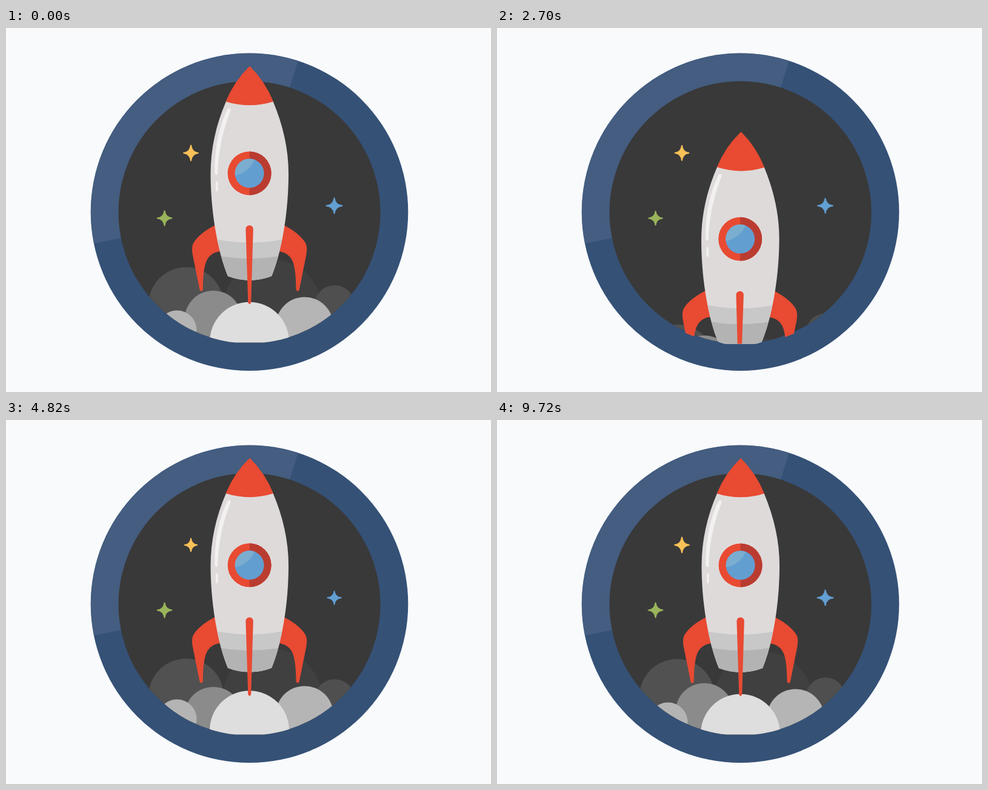
Recreate the animation shown at these times as an HTML page. Size 800 by 600 pixels, loop 9.76 s.

```html
<!DOCTYPE html>
<html lang="en">
<head>
<meta charset="utf-8">
<title>Rocket badge</title>
<style>
html, body { margin: 0; width: 100%; height: 100%; overflow: hidden; background: #f8fafc; }
svg { display: block; width: 800px; height: 600px; }
</style>
</head>
<body>
<svg viewBox="0 0 800 600">
  <defs>
    <path id="sky" d="M185.5 303.7A216 216 0 0 1 617.5 303.7A216 216 0 0 1 424 518.6H379A216 216 0 0 1 185.5 303.7Z"/>
    <path id="hull" d="M363 121C346 160 337.5 200 337.5 240C337.5 300 348 365 366 409Q402 422.5 438 409C456 365 466 300 466 240C466 200 457 160 440.5 121Z"/>
    <path id="fin" d="M345 325C331 332 317 342 310 353C306.5 358.5 306.6 365 307.7 373L319.5 431.5Q322 436 324.7 431.5C325 412 326 398 329.5 387C333.5 375.5 342 369 354 368.2Z"/>
    <clipPath id="skyClip"><use href="#sky"/></clipPath>
    <clipPath id="hullClip"><use href="#hull"/></clipPath>
    <clipPath id="glassClip"><circle cx="401.6" cy="239.5" r="24"/></clipPath>
    <clipPath id="launchClip"><path d="M0 0H800V304H620A218.5 218.5 0 0 1 429.500 520.6H373.500A218.5 218.5 0 0 1 183 304H0Z"/></clipPath>
  </defs>

  <circle cx="401.5" cy="303.3" r="261.8" fill="#355176"/>
  <path d="M401.5 303.3L145.2 355.3A261.8 261.8 0 0 1 482 54.3Z" fill="#445d80"/>
  <use href="#sky" fill="#393939"/>
  <g id="stars"></g>
  <g id="clouds" clip-path="url(#skyClip)"></g>

  <g clip-path="url(#launchClip)">
    <g id="rocket">
      <g fill="#e84a32">
        <use href="#fin"/>
        <use href="#fin" transform="translate(803.2 0) scale(-1 1)"/>
      </g>
      <use href="#hull" fill="#dedada"/>
      <g clip-path="url(#hullClip)">
        <path d="M330 344.5Q401.7 363 473 344.5V430H330Z" fill="#c8c8c8"/>
        <path d="M330 371Q401.7 389 473 371V430H330Z" fill="#b3b3b3"/>
      </g>
      <path d="M362.5 121.2Q376.5 87.500 400.8 64Q402 62.3 403.2 64Q427 87.500 441 121.2Q402 133.5 362.5 121.2Z" fill="#e84a32"/>
      <path d="M365 134.5C350 165 343.5 205 344.7 240A2.3 2.3 0 0 0 349.3 240C349.5 208 357 170 370 137.5C372 132 367 131 365 134.5Z" fill="#f2f0f0"/>
      <path d="M347.8 254.5V267.5" stroke="#f2f0f0" stroke-width="3.4" stroke-linecap="round"/>
      <circle cx="401.6" cy="239.5" r="36" fill="#e84a32"/>
      <path d="M401.6 203.5A36 36 0 0 1 401.6 275.5Z" fill="#ba3c31"/>
      <g clip-path="url(#glassClip)">
        <rect x="376" y="214" width="52" height="52" fill="#639ed1"/>
        <path d="M374 243.5Q401 240 412 214H374Z" fill="#7aadcf"/>
      </g>
      <path d="M395.4 331.5A6.2 6.2 0 0 1 407.8 331.5L404.2 452.5Q401.7 457.5 399.3 452.5Z" fill="#e84a32"/>
    </g>
  </g>
</svg>
<script>
const LOOP = 9760, CUT = 1800, RISE = 1977, CLOUD_RISE = 2200, RISE_TIME = 1200;
const NS = 'http://www.w3.org/2000/svg';
const $ = id => document.getElementById(id);

function add(parent, tag, attrs) {
  const el = document.createElementNS(NS, tag);
  for (const k in attrs) el.setAttribute(k, attrs[k]);
  return parent.appendChild(el);
}

const clamp = x => Math.max(0, Math.min(1, x));
const cubic = x => x < 0.5 ? 4 * x ** 3 : 1 - 4 * (1 - x) ** 3;
const wave = x => (1 - Math.cos(Math.PI * x)) / 2;

// One beat is half a bob; the tempo slows before the restart
const beat = t => t < CUT ? 7 + t / 1340 : (t - 3650) / 870;

// top is the highest position, dip how far a cloud bobs below it
const clouds = [
  { x: 297, top: 380, r: 62, fill: '#515151', dip: 20, rate: 0.36, shift: 2.12 },
  { x: 439, top: 368, r: 82, fill: '#404040', dip: 14, rate: 0.42, shift: 0.06 },
  { x: 542, top: 411.5, r: 33, fill: '#4f4f4f', dip: 16, rate: 1.1, shift: -0.39 },
  { x: 342, top: 424, r: 47.5, fill: '#8b8b8b', dip: 16, rate: 1.15, shift: -0.59 },
  { x: 492.5, top: 424.5, r: 47.5, fill: '#b5b5b5', dip: 19, rate: 1, shift: 0 },
  { x: 282, top: 446.5, r: 32.5, fill: '#b4b4b4', dip: 19, rate: 1, shift: 0 },
  { x: 401.5, top: 433.5, r: 65.5, fill: '#dedede', dip: 18.3, rate: 0.42, shift: 0.06 }
];

const stars = [
  { x: 305, y: 206, w: 11.8, h: 12.4, fill: '#f9c158', rate: 0.95 },
  { x: 261.5, y: 313.5, w: 11.8, h: 11.8, fill: '#9ab45b', rate: 0.7 },
  { x: 541.5, y: 293, w: 13, h: 12.4, fill: '#629fd3', rate: 0.95 }
];

for (const c of clouds) c.el = add($('clouds'), 'circle', { cx: c.x, r: c.r, fill: c.fill });
for (const s of stars) {
  const { w, h } = s;
  s.el = add($('stars'), 'path', {
    d: `M0 ${-h}Q1.2-1.2 ${w} 0Q1.2 1.2 0 ${h}Q-1.2 1.2 ${-w} 0Q-1.2-1.2 0 ${-h}Z`,
    fill: s.fill, stroke: s.fill, 'stroke-width': 2.2, 'stroke-linejoin': 'round'
  });
}

// Clouds rise from a depth set by their size, then bob
function cloudDepth(c, t) {
  const risen = t < CUT ? 1 : cubic(clamp((t - CLOUD_RISE) / RISE_TIME));
  const bob = c.dip * wave(beat(t) * c.rate + c.shift);
  const sunk = 2.45 * c.r;
  return sunk + (bob - sunk) * risen;
}

// Rise past the rest height, then sink back gently
function rocketPose(t) {
  if (t < CUT) return { y: 0, turn: 0 };
  const u = clamp((t - RISE) / RISE_TIME);
  const y = u < 1 ? 500 - 522 * cubic(u) : -22 * (1 - wave(clamp((t - 3300) / 1600)));
  return { y, turn: 0.33 * Math.sin(Math.PI * u) };
}

function draw(t) {
  for (const c of clouds) c.el.setAttribute('cy', c.top + c.r + cloudDepth(c, t));
  for (const s of stars) {
    const size = 1 - 0.19 * wave((beat(t) - 7) * s.rate);
    s.el.setAttribute('transform', `translate(${s.x} ${s.y}) scale(${size})`);
  }
  const p = rocketPose(t);
  $('rocket').setAttribute('transform', `translate(0 ${p.y}) rotate(${p.turn} 402 160)`);
}

const start = performance.now();
function tick() {
  draw((performance.now() - start) % LOOP);
  requestAnimationFrame(tick);
}
tick();
</script>
</body>
</html>
```
